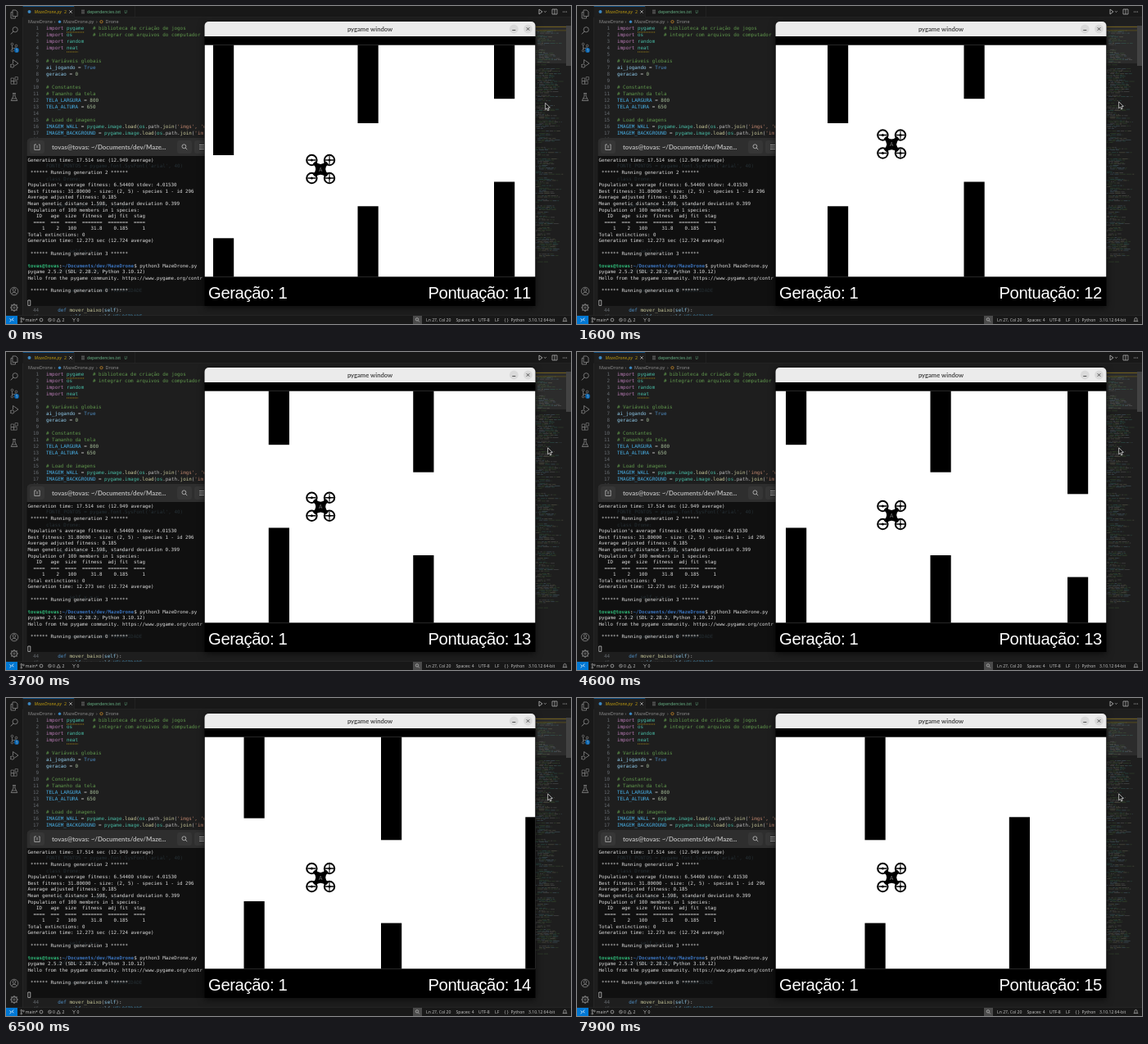
Animation of 690 by 388 pixels, one loop 8 s. Source, as an HTML page with a canvas:

```html
<!DOCTYPE html>
<html lang="pt">
<head>
<meta charset="utf-8">
<title>MazeDrone</title>
<style>
html, body { margin: 0; width: 100%; height: 100%; overflow: hidden; background: #1e1e1e; }
canvas { display: block; }
</style>
</head>
<body>
<canvas id="stage" width="690" height="388"></canvas>
<script>
const W = 690, H = 388, LOOP = 8000;
const MONO = '"DejaVu Sans Mono", "Liberation Mono", monospace';
const UI = '"Noto Sans", "Open Sans", sans-serif';
const TITLE = 'Lato, "Open Sans", sans-serif';
const GAME = '"Liberation Sans", Arial, sans-serif';
const EDITOR = '#1e1e1e', PANEL = '#181818', BORDER = '#2a2a2a';
const C = {
  kw: '#b87bb5', mod: '#47b8a2', com: '#5f964c', con: '#48b0e6', v: '#8ec8e8',
  num: '#a6bd99', bool: '#4f8ec4', fn: '#c8c89a', str: '#bb826b', txt: '#b8b8b8'
};

const stage = document.getElementById('stage').getContext('2d');
let g = stage;

const clamp = (v, lo, hi) => Math.max(lo, Math.min(hi, v));

function rect(x, y, w, h, fill) {
  g.fillStyle = fill;
  g.fillRect(x, y, w, h);
}
function round(x, y, w, h, r, fill) {
  g.fillStyle = fill;
  g.beginPath();
  g.roundRect(x, y, w, h, r);
  g.fill();
}
function disc(x, y, r, fill) {
  g.fillStyle = fill;
  g.beginPath();
  g.arc(x, y, r, 0, 7);
  g.fill();
}
function ring(x, y, r, color, w = 1) {
  g.strokeStyle = color;
  g.lineWidth = w;
  g.beginPath();
  g.arc(x, y, r, 0, 7);
  g.stroke();
}
function line(color, w, ...p) {
  g.strokeStyle = color;
  g.lineWidth = w;
  g.beginPath();
  for (let i = 0; i < p.length; i += 2) g.lineTo(p[i], p[i + 1]);
  g.stroke();
}
function text(s, x, y, font, color, align = 'left') {
  g.font = font;
  g.fillStyle = color;
  g.textAlign = align;
  g.fillText(s, x, y);
}
// parts: alternating string and colour, laid out one after another
function spans(parts, x, y, font) {
  for (let i = 0; i < parts.length; i += 2) {
    text(parts[i], x, y, font, parts[i + 1]);
    x += g.measureText(parts[i]).width;
  }
}
function random(seed) {
  return () => (seed = (seed * 16807) % 2147483647) / 2147483647;
}

// ---- editor ----
const load = (name, rest) => [name, C.con, ' = ', C.txt, 'pygame', C.mod, '.', C.txt, 'image', C.mod,
  '.', C.txt, 'load', C.fn, '(', C.txt, 'os', C.mod, '.path.', C.txt, 'join', C.fn, '(', C.txt, rest, C.str];
const code = {
  1: ['import ', C.kw, 'pygame', C.mod, '   # biblioteca de criação de jogos', C.com],
  2: ['import ', C.kw, 'os', C.mod, '       # integrar com arquivos do computador', C.com],
  3: ['import ', C.kw, 'random', C.mod],
  4: ['import ', C.kw, 'neat', C.mod],
  6: ['# Variáveis globais', C.com],
  7: ['ai_jogando', C.v, ' = ', C.txt, 'True', C.bool],
  8: ['geracao', C.v, ' = ', C.txt, '0', C.num],
  10: ['# Constantes', C.com],
  11: ['# Tamanho da tela', C.com],
  12: ['TELA_LARGURA', C.con, ' = ', C.txt, '800', C.num],
  13: ['TELA_ALTURA', C.con, ' = ', C.txt, '650', C.num],
  15: ['# Load de imagens', C.com],
  16: load('IMAGEM_WALL', "'imgs', 'w"),
  17: load('IMAGEM_BACKGROUND', "'im"),
  44: ['    def ', C.bool, 'mover_baixo', C.fn, '(', C.txt, 'self', C.v, '):', C.txt],
  45: ['        self', C.v, '.y += ', C.txt, 'self', C.v, '.VELOCIDADE', C.con]
};

function drawCode() {
  const font = '5.92px ' + MONO;
  for (let n = 1; n <= 45; n++) {
    const y = 21.2 + n * 8;
    text(n, 40, y, font, '#666b70', 'right');
    if (code[n]) spans(code[n], 49, y, font);
  }
  for (const [y, n] of [[32, 6], [56, 4]]) {
    g.setLineDash([1.2, 0.8]);
    line('#b08d10', 0.8, 74, y, 74 + n * 3.56, y);
    g.setLineDash([]);
  }
}

function drawActivityBar() {
  const c = '#7c7c7c';
  rect(0, 0, 20, H, PANEL);
  rect(20, 0, 0.6, 378, BORDER);
  g.lineJoin = 'round';
  // files
  line(c, 0.9, 8, 5, 12, 5, 14, 7, 14, 12.5, 8, 12.5, 8, 5);
  line(c, 0.9, 8, 7.5, 6, 7.5, 6, 15, 11.5, 15, 11.5, 12.5);
  // search
  ring(11.2, 28.8, 3.1, c, 0.9);
  line(c, 1, 9, 31, 5.8, 34.4);
  // branches
  ring(7.5, 46.5, 1.3, c, 0.8);
  ring(7.5, 54.5, 1.3, c, 0.8);
  ring(12.5, 48.5, 1.3, c, 0.8);
  line(c, 0.8, 7.5, 48, 7.5, 53);
  line(c, 0.8, 12.5, 50, 11, 51.5, 7.5, 51.5);
  disc(13, 54, 2.9, '#0b66b0');
  text('1', 13, 55.7, '4.5px ' + UI, '#ddd', 'center');
  // run and debug
  line(c, 0.9, 8.5, 70, 8.5, 65.5, 15, 70, 10.5, 73);
  ring(7.8, 73, 2.1, c, 0.9);
  line(c, 0.7, 5, 71, 6, 72);
  line(c, 0.7, 5, 75, 6, 74);
  // extensions
  g.strokeRect(6, 88, 3.6, 3.6);
  g.strokeRect(6, 91.6, 3.6, 3.6);
  g.strokeRect(9.6, 91.6, 3.6, 3.6);
  g.strokeRect(11, 86.6, 3.4, 3.4);
  // flask
  line(c, 0.9, 8, 106.5, 12, 106.5);
  line(c, 0.9, 9, 106.5, 9, 110, 6.2, 115.5, 13.8, 115.5, 11, 110, 11, 106.5);
  line(c, 0.8, 7.5, 113, 12.5, 113);
  // account
  ring(10, 348, 4.8, c, 0.9);
  ring(10, 346.5, 1.8, c, 0.9);
  line(c, 0.9, 7, 351.5, 8.2, 349.6, 11.8, 349.6, 13, 351.5);
  // gear
  ring(10, 368, 3.4, c, 1.1);
  ring(10, 368, 1.1, c, 0.8);
  for (let i = 0; i < 8; i++) {
    const a = i * Math.PI / 4, x = Math.cos(a), y = Math.sin(a);
    line(c, 1.2, 10 + x * 3.6, 368 + y * 3.6, 10 + x * 5, 368 + y * 5);
  }
}

function drawTabs() {
  const f = '5.5px ' + UI, gray = '#8c8c8c';
  rect(20, 0, W, 13.5, PANEL);
  rect(20.6, 0, 62.4, 13.5, EDITOR);
  rect(20.6, 0, 62.4, 0.7, '#0b66b0');
  rect(83, 13, W, 0.5, BORDER);
  rect(83, 0, 0.5, 13.5, BORDER);
  rect(157, 0, 0.5, 13.5, BORDER);
  disc(28.5, 7, 2, '#3c87c0');
  text('MazeDrone.py', 34.5, 9, 'italic 5.3px ' + UI, '#b8960f');
  text('2', 71, 9, '5.3px ' + UI, '#b8960f');
  line('#ccc', 0.7, 77.3, 5.3, 80.7, 8.7);
  line('#ccc', 0.7, 80.7, 5.3, 77.3, 8.7);
  for (let i = 0; i < 3; i++) line(gray, 0.7, 92, 5.2 + i * 1.8, 96, 5.2 + i * 1.8);
  text('dependencies.txt', 99, 9, '5.1px ' + UI, '#67b184');
  text('U', 144.5, 9, '4.6px ' + UI, '#67b184');

  text('MazeDrone', 27, 21, f, gray);
  text('›', 58.5, 21, f, gray);
  disc(65.5, 19.2, 1.7, '#3c87c0');
  text('MazeDrone.py', 70, 21, f, gray);
  text('›', 110, 21, f, gray);
  ring(116.5, 19.2, 1.6, '#c98828', 0.8);
  text('Drone', 121.5, 21, f, gray);

  line('#bbb', 0.8, 651, 4, 655, 7, 651, 10, 651, 4);
  line('#bbb', 0.7, 657, 6.2, 658.4, 7.6, 659.8, 6.2);
  g.strokeRect(667, 4, 6, 6);
  line('#bbb', 0.7, 670, 4, 670, 10);
  for (let i = 0; i < 3; i++) disc(680.5 + i * 2, 7, 0.6, '#bbb');
}

function drawMinimap() {
  const rnd = random(77), hues = [C.v, C.txt, C.com, C.mod, C.fn, C.com];
  rect(640, 24, 44, 46, 'rgba(121,121,121,.16)');
  g.globalAlpha = 0.28;
  for (let y = 25; y < 312; y += 1.55) {
    if (rnd() < 0.2) continue;
    let x = 645 + Math.floor(rnd() * 4) * 2;
    const end = x + 6 + rnd() * 24;
    while (x < end) {
      const w = 1.5 + rnd() * 6;
      rect(x, y, Math.min(w, end - x), 0.7, hues[Math.floor(rnd() * hues.length)]);
      x += w + 1;
    }
  }
  g.globalAlpha = 1;
  rect(647, 25, 37, 0.8, '#7d6816');
  rect(647, 29.5, 37, 0.8, '#5d5017');
  rect(684, 24, 6, 49, 'rgba(121,121,121,.4)');
}

function drawStatus() {
  const f = '5.1px ' + UI, y = 384.9, c = '#c0c0c0';
  rect(0, 378, W, 10, PANEL);
  rect(0, 377.5, W, 0.5, BORDER);
  rect(0, 378, 14, 10, '#0078d4');
  line('#fff', 0.8, 4.5, 381.5, 6.5, 383.3, 4.5, 385.1);
  line('#fff', 0.8, 9.3, 380.6, 7.3, 382.4, 9.3, 384.2);
  ring(18.7, 381.2, 0.9, c, 0.6);
  ring(18.7, 385.2, 0.9, c, 0.6);
  ring(21.4, 382, 0.9, c, 0.6);
  line(c, 0.6, 18.7, 382, 18.7, 384.4);
  text('main*', 23.8, y, f, c);
  ring(43, 383, 1.9, c, 0.7);
  ring(53.5, 383, 1.9, c, 0.6);
  line(c, 0.6, 52.5, 382, 54.5, 384);
  text('0', 57, y, f, c);
  line(c, 0.6, 62, 385, 64.2, 381, 66.4, 385, 62, 385);
  text('2', 68.5, y, f, c);
  line(c, 0.6, 81, 380.8, 83, 383, 85, 380.8);
  line(c, 0.6, 83, 383, 83, 385.4);
  text('0', 86.5, y, f, c);
  rect(497, 378, 11, 10, '#4a4a4a');
  ring(502, 382.4, 1.7, c, 0.7);
  line(c, 0.7, 503.3, 383.8, 504.9, 385.4);
  text('Ln 27, Col 20', 513, y, f, c);
  text('Spaces: 4', 549.5, y, f, c);
  text('UTF-8', 577, y, f, c);
  text('LF', 597, y, f, c);
  text('{ }', 608.5, y, f, c);
  text('Python', 616.5, y, f, c);
  text('3.10.12 64-bit', 638, y, f, c);
  line(c, 0.7, 680, 384.6, 681, 383.6, 681, 381.4, 682.5, 380.4, 684, 381.4, 684, 383.6, 685, 384.6, 680, 384.6);
}

// ---- terminal ----
const log = {
  0: 'Generation time: 17.514 sec (12.949 average)',
  2: ' ****** Running generation 2 ******',
  4: "Population's average fitness: 6.54400 stdev: 4.01530",
  5: 'Best fitness: 31.80000 - size: (2, 5) - species 1 - id 296',
  6: 'Average adjusted fitness: 0.185',
  7: 'Mean genetic distance 1.598, standard deviation 0.399',
  8: 'Population of 100 members in 1 species:',
  9: '   ID   age  size  fitness  adj fit  stag',
  10: '  ====  ===  ====  =======  =======  ====',
  11: '     1    2   100     31.8    0.185     1',
  12: 'Total extinctions: 0',
  13: 'Generation time: 12.273 sec (12.724 average)',
  15: ' ****** Running generation 3 ******',
  18: 'pygame 2.5.2 (SDL 2.28.2, Python 3.10.12)',
  19: 'Hello from the pygame community. https://www.pygame.org/contr',
  21: ' ****** Running generation 0 ******'
};
// editor code showing through the terminal
const ghost = {
  22: 'FONTE_PONTOS = pygame.font.SysFont(\'arial\', 40)',
  24: 'class Drone:', 28: '    def __init__(self, x, y):',
  35: '        self.y = y', 38: '    def mover_cima(self):',
  41: '        self.y -= self.VELOCIDADE'
};

function drawTerminal() {
  const f = '5.82px ' + MONO, ink = '#dcdcdc', dim = '#a8a8a8';
  const x = 26.5, row = n => 190.1 + n * 7.565;
  round(25.5, 161, 230, 205, [5, 5, 0, 0], '#101010');
  g.globalAlpha = 0.17;
  for (const n in ghost) text(ghost[n], 49, 21.2 + n * 8, '5.92px ' + MONO, C.v);
  g.globalAlpha = 1;
  round(25.5, 161, 230, 22, [5, 5, 0, 0], '#2e2e2e');
  for (const bx of [29, 209, 230]) round(bx, 164, 18, 16, 3, '#363636');
  line(dim, 0.9, 37, 169, 34.8, 169, 34.8, 175.5, 41.2, 175.5, 41.2, 169, 39.8, 169);
  line(dim, 0.9, 38, 170, 38, 173.5);
  ring(217.4, 171.3, 2.4, dim, 1);
  line(dim, 1, 219.2, 173.1, 221.2, 175.2);
  for (let i = 0; i < 3; i++) line(dim, 0.9, 236, 169.5 + i * 2.5, 242, 169.5 + i * 2.5);
  text('tovas@tovas: ~/Documents/dev/Maze...', 56, 174.7, 'bold 7.8px ' + TITLE, '#b4b4b4');
  for (const n in log) text(log[n], x, row(+n), f, ink);
  spans(['tovas@tovas', '#2fb878', ':', ink, '~/Documents/dev/MazeDrone', '#3a72bb'],
    x, row(17), 'bold ' + f);
  text('$ python3 MazeDrone.py', x + 37 * 3.504, row(17), f, ink);
  g.strokeStyle = ink;
  g.lineWidth = 0.7;
  g.strokeRect(26.8, 359, 3, 6.4);
}

// ---- game window ----
const win = { x: 242.5, y: 19, w: 404, top: 47.4, bottom: 330.6, end: 366 };

function drawFrame() {
  g.save();
  g.shadowColor = 'rgba(0,0,0,.6)';
  g.shadowBlur = 9;
  g.shadowOffsetY = 2;
  round(win.x, win.y, win.w, win.end - win.y, [5, 5, 0, 0], '#000');
  g.restore();
  round(win.x, win.y, win.w, 18, [5, 5, 0, 0], '#ebebeb');
  text('pygame window', 444.5, 30.8, 'bold 7.6px ' + TITLE, '#4a4a4a', 'center');
  disc(620.3, 28, 5.4, '#dadada');
  disc(637.5, 28, 5.4, '#dadada');
  line('#444', 0.9, 618.3, 29.5, 622.3, 29.5);
  line('#444', 0.9, 635.7, 26.2, 639.3, 29.8);
  line('#444', 0.9, 639.3, 26.2, 635.7, 29.8);
}

function background() {
  const layer = document.createElement('canvas');
  layer.width = W;
  layer.height = H;
  g = layer.getContext('2d');
  rect(0, 0, W, H, EDITOR);
  drawCode();
  drawActivityBar();
  drawTabs();
  drawMinimap();
  drawStatus();
  drawTerminal();
  drawFrame();
  g = stage;
  return layer;
}

// time and distance scrolled
const path = [[0, 0], [1600, 123.5], [2800, 209.5], [4600, 341], [5700, 424.5], [6100, 455],
  [6200, 455], [6300, 466.5], [6500, 482], [7900, 588.5], [8000, 596]];
function scrolled(t) {
  const i = path.findIndex(p => p[0] > t);
  const [t0, d0] = path[i - 1], [t1, d1] = path[i];
  return d0 + (d1 - d0) * (t - t0) / (t1 - t0);
}

// left edge at the start, top of the gap
const walls = [[253, 182], [429.5, 143], [596, 113.2], [772.5, 146.7], [940, 173.3], [1116.3, 44]];
const WALL_W = 25.2, GAP = 101.3;

function drawDrone(x, y) {
  g.save();
  g.translate(x, y);
  for (const sx of [-1, 1]) for (const sy of [-1, 1]) {
    const rx = sx * 10.8, ry = sy * 11;
    disc(rx, ry, 7.2, '#000');
    disc(rx, ry, 5.2, '#fff');
    line('#000', 1.4, rx - 5, ry, rx + 5, ry);
    if (sx > 0) line('#000', 1.1, rx, ry - 5, rx, ry + 5);
    disc(rx, ry, 1.5, '#000');
  }
  // body: four arms with concave sides
  g.fillStyle = '#000';
  g.beginPath();
  g.moveTo(-9.5, -6.5);
  g.lineTo(-6.5, -9.5);
  g.quadraticCurveTo(0, -2.5, 6.5, -9.5);
  g.lineTo(9.5, -6.5);
  g.quadraticCurveTo(2.5, 0, 9.5, 6.5);
  g.lineTo(6.5, 9.5);
  g.quadraticCurveTo(0, 4, -6.5, 9.5);
  g.lineTo(-9.5, 6.5);
  g.quadraticCurveTo(-2.5, 0, -9.5, -6.5);
  g.fill();
  text('A', 0, 2.6, '6.5px ' + GAME, '#777', 'center');
  g.restore();
}

function drawCursor(x, y) {
  const p = [0, 0, 0, 8, 1.8, 6.4, 3, 9.2, 4.4, 8.6, 3.2, 5.9, 5.6, 5.8];
  g.beginPath();
  for (let i = 0; i < p.length; i += 2) g.lineTo(x + p[i], y + p[i + 1]);
  g.closePath();
  g.fillStyle = '#111';
  g.fill();
  g.strokeStyle = '#d8d8d8';
  g.lineWidth = 0.8;
  g.stroke();
}

function drawGame(t) {
  const d = scrolled(t);
  const since = at => d - at;
  const droneY = 199 - clamp(since(88.5), 0, 30.5) + clamp(since(255), 0, 30.5) + clamp(since(431.5), 0, 20);
  let score = 10;

  g.save();
  g.beginPath();
  g.rect(win.x, win.top, win.w, win.bottom - win.top);
  g.clip();
  rect(win.x, win.top, win.w, win.bottom - win.top, '#fff');
  for (const [x0, gap] of walls) {
    const x = x0 - d;
    rect(x, 0, WALL_W, gap, '#000');
    rect(x, gap + GAP, WALL_W, H, '#000');
    if (x < 366) score++;
  }
  drawDrone(384.2, droneY);
  g.restore();

  g.save();
  g.fontKerning = 'none';
  g.letterSpacing = '-0.4px';
  text('Geração: 1', 247, 356.6, '20.3px ' + GAME, '#fff');
  text('Pontuação: ' + score, 641, 356.6, '20.3px ' + GAME, '#fff', 'right');
  g.restore();
}

const back = background();

function draw(now) {
  const t = Math.floor(now % LOOP / 100) * 100;
  g.drawImage(back, 0, 0);
  drawGame(t);
  const k = clamp(t / 800, 0, 1);
  drawCursor(658.7 + 3 * k, 118.3 - 1.5 * k);
}

const start = performance.now();
function tick() {
  draw(performance.now() - start);
  requestAnimationFrame(tick);
}
tick();
</script>
</body>
</html>
```
